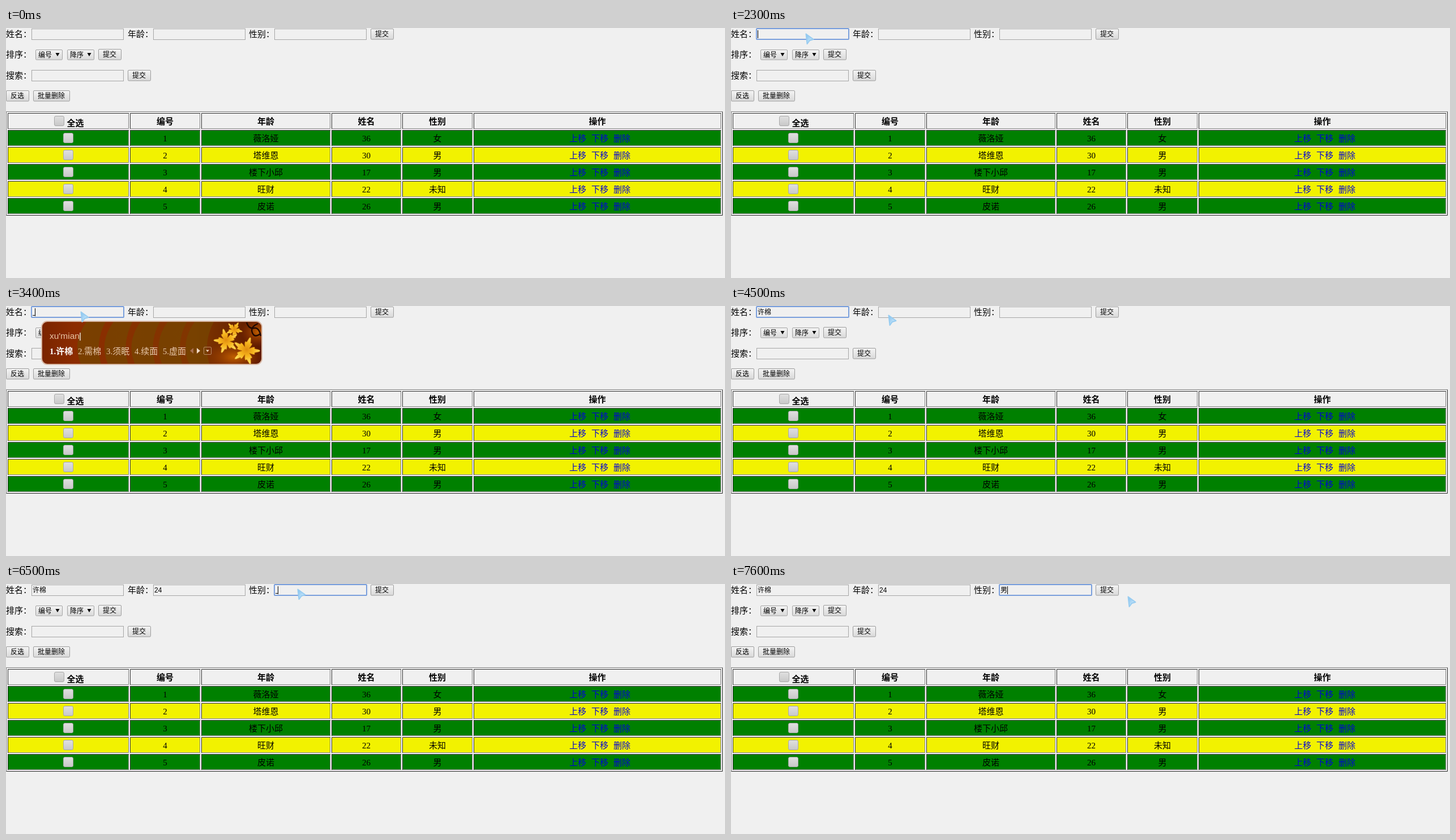
An HTML page that plays this animation: 1270x441 px, repeating every 8 s.

```html
<!DOCTYPE html>
<html lang="zh-CN">
<head>
<meta charset="utf-8">
<title>表格</title>
<style>
html, body { margin: 0; width: 100%; height: 100%; overflow: hidden; background: #f0f0f0; }
svg { display: block; }
text { font-family: "Liberation Serif", "Noto Sans CJK SC", serif; white-space: pre; }
.ui { font-family: "Liberation Sans", "Noto Sans CJK SC", sans-serif; }
</style>
</head>
<body>
<svg width="1270" height="441" viewBox="0 0 1270 441">
  <defs>
    <linearGradient id="btn" x2="0" y2="1"><stop stop-color="#f4f4f4"/><stop offset="1" stop-color="#d9d9d9"/></linearGradient>
    <linearGradient id="box" x2="0" y2="1"><stop stop-color="#e0e0e0"/><stop offset="1" stop-color="#c8c8c8"/></linearGradient>
    <linearGradient id="skin"><stop stop-color="#7a2400"/><stop offset=".15" stop-color="#8c2c00"/><stop offset=".7" stop-color="#803600"/><stop offset="1" stop-color="#5c1800"/></linearGradient>
    <radialGradient id="glow"><stop stop-color="#d06a00" stop-opacity=".85"/><stop offset="1" stop-color="#a03c00" stop-opacity="0"/></radialGradient>
    <radialGradient id="leafFill"><stop stop-color="#e08c10"/><stop offset=".5" stop-color="#f6b41c"/><stop offset="1" stop-color="#ffdc58"/></radialGradient>
    <linearGradient id="arrow" x2="1" y2="1"><stop stop-color="#7fc0ee"/><stop offset="1" stop-color="#e2f3ff"/></linearGradient>
    <path id="leaf" fill="url(#leafFill)" stroke="#c07008" stroke-width=".7"/>
  </defs>
  <g id="page"></g>
  <g id="live"></g>
  <g id="popup"></g>
  <path id="cursor" d="M1.5 1.5 L14.5 11 L8 13 L3.5 19Z" fill="url(#arrow)" stroke="#98ccf0" stroke-width="2" stroke-linejoin="round"/>
</svg>
<script>
const $ = id => document.getElementById(id);
const LOOP = 8000, STEP = 100;

const rect = (x, y, w, h, fill, more = '') =>
  `<rect x="${x}" y="${y}" width="${w}" height="${h}" fill="${fill}" ${more}/>`;
const text = (s, x, cy, size = 15, more = '') =>
  `<text x="${x}" y="${cy + size * .37}" font-size="${size}" ${more}>${s}</text>`;
const small = (s, x, cy) => text(s, x, cy, 12, 'class="ui"');
const centred = (s, x, cy, more = '') => text(s, x, cy, 15, `text-anchor="middle" ${more}`);

const field = (x, y) => rect(x + .5, y + .5, 162, 19, '#f0f0f0', 'stroke="#a6a6a6"');
const button = (s, x, y) =>
  rect(x + .5, y + .5, s.length * 12 + 16, 18.5, 'url(#btn)', 'rx="1.5" stroke="#9c9c9c"') + small(s, x + 8, y + 10);
const select = (s, x, y) =>
  rect(x + .5, y + .5, 47, 17.5, 'url(#btn)', 'rx="1.5" stroke="#a4a4a4"') + small(s, x + 5, y + 9.5) +
  `<path d="M${x + 35.5} ${y + 6}h7l-3.5 6z"/>`;
const checkbox = (x, y) => rect(x + .5, y + .5, 17, 17, 'url(#box)', 'rx="2.5" stroke="#a9a9a9"');

// A one pixel bevel: first colour on the top and left, second on the bottom and right.
const bevel = (x, y, w, h, fill, light, dark) =>
  rect(x, y, w, h, fill) +
  `<path d="M${x} ${y + h - .5}h${w - .5}v${.5 - h}" fill="none" stroke="${dark}"/>` +
  `<path d="M${x + .5} ${y + h}v${.5 - h}h${w - .5}" fill="none" stroke="${light}"/>`;

const cols = [3, 219, 345, 575, 700, 826, 1265];
const rows = [
  ['', '编号', '年龄', '姓名', '性别', '操作'],
  ['', 1, '薇洛娅', 36, '女', ''],
  ['', 2, '塔维恩', 30, '男', ''],
  ['', 3, '楼下小邱', 17, '男', ''],
  ['', 4, '旺财', 22, '未知', ''],
  ['', 5, '皮诺', 26, '男', '']
];

function tableRow(words, r) {
  const y = 150 + 30 * r, cy = y + 14.5;
  const fill = r ? ['#f2f200', '#008000'][r % 2] : '#f0f0f0';
  const weight = r ? '' : 'font-weight="700"';
  const cells = words.map((s, c) => {
    const x = cols[c], w = cols[c + 1] - 2 - x;
    return bevel(x, y, w, 28, fill, '#333', '#858585') + centred(s, x + w / 2, cy, weight);
  }).join('');
  if (!r) return cells + checkbox(85, y + 5) + text('全选', 107.5, cy + 3, 15, weight);
  const links = ['上移', '下移', '删除'].map((s, i) => text(s, 995 + 39 * i, cy, 15, 'fill="#0000d8"'));
  return cells + checkbox(101, y + 5) + links.join('');
}

const inputs = [45, 260, 474];
$('page').innerHTML =
  ['姓名：', '年龄：', '性别：'].map((s, i) => text(s, inputs[i] - 45, 10) + field(inputs[i], 1)).join('') +
  button('提交', 644, 1) +
  text('排序：', 0, 46.5) + select('编号', 52, 38) + select('降序', 108, 38) + button('提交', 163, 37) +
  text('搜索：', 0, 83.5) + field(45, 74) + button('提交', 215, 74) +
  button('反选', 0, 110) + button('批量删除', 48, 110) +
  bevel(0, 147, 1266, 184, '#f0f0f0', '#808080', '#2c2c2c') + rows.map(tableRow).join('');

// Five serrated lobes in polar form.
$('leaf').setAttribute('d', 'M' + Array.from({ length: 90 }, (_, i) => {
  const a = i * Math.PI / 45, r = 16 + 6 * Math.cos(5 * a) + 3 * Math.cos(15 * a);
  return (r * Math.sin(a)).toFixed(1) + ' ' + (-r * Math.cos(a)).toFixed(1);
}).join('L') + 'Z');

// Pointer moves: start, end, x, y
const moves = [
  [0, 0, 95, 182], [100, 900, 239, 13], [900, 1000, 304, 60], [1000, 1300, 140, 8], [1300, 1600, 131, 9],
  [3800, 3900, 193, 7], [4200, 4500, 277, 15], [5500, 5600, 295, 18], [5700, 5900, 450, 20],
  [6000, 6300, 514, 8], [7500, 7600, 700, 21]
];

// Input events: time, field, value, letters being composed, candidates
const events = [
  [1300, 0, ''],
  [2700, 0, '', 'x', '想 小 下 向 新'],
  [2800, 0, '', 'xu', '徐 许 需 虚 续'],
  [3000, 0, '', "xu'mi", '须弥 徐 许 需 虚'],
  [3200, 0, '', "xu'mia", '许棉 需棉 须眠 徐 许'],
  [3400, 0, '', "xu'mian", '许棉 需棉 须眠 续面 虚面'],
  [3600, 0, '许棉'],
  [4600, 1, ''],
  [5300, 1, '2'],
  [5500, 1, '24'],
  [6200, 2, ''],
  [6500, 2, '', 'n'],
  [7000, 2, '', 'na', '纳 那 拿 (=@__@=)哪里? 哪'],
  [7100, 2, '', 'nan', '男 南 难 楠 喃'],
  [7200, 2, '男']
];

const pen = document.createElement('canvas').getContext('2d');
function measure(s, size, font) {
  pen.font = `${size}px "${font}", "Noto Sans CJK SC", sans-serif`;
  return pen.measureText(s).width;
}

function pointer(t) {
  let [, , x, y] = moves[0];
  for (const [start, end, tx, ty] of moves.slice(1)) {
    if (t < start) break;
    const p = Math.min(1, (t - start) / (end - start)) ** 1.6;
    x += (tx - x) * p;
    y += (ty - y) * p;
  }
  return t < STEP ? [-50, -50] : [x, y];
}

function drawInputs(t, event) {
  if (!event) return '';
  const [time, focus, , typed] = event, values = ['', '', ''];
  for (const [start, i, value] of events) if (start <= t) values[i] = value;
  const x = inputs[focus];
  let out = rect(x, 1, 163, 19, '#f0f0f0', 'rx="1.5" stroke="#7a9fdc" stroke-width="2"');
  inputs.forEach((left, i) => out += small(values[i], left + 2, 10.5));
  const caret = Math.round(x + 2 + measure(values[focus], 12, 'Liberation Sans')) + (typed ? 4 : 0);
  if ((t - time) % 1000 < 500) out += rect(caret, 4, 1, 14, '#000');
  if (typed) out += rect(x + 2, 16, 4, 1, '#000');
  return out;
}

function drawPopup(event) {
  const [, focus, , typed, words] = event || [];
  if (!words) return '';
  const list = words.split(' ').map((s, i) => `${i + 1}.${s}`);
  const space = 8.7, size = 15;
  const w = Math.round(150 + measure(list.join(''), size, 'Liberation Serif') + space * 4);

  let sweeps = '';
  const gap = (w - 152) / 5;
  for (let i = 0; i < 5; i++) {
    const a = 66 + gap * i;
    sweeps += `<path d="M${a + 14} 2Q${a - 12} 38 ${a + 4} 76h${gap * .75}Q${a + gap * .6} 38 ${a + gap} 2Z" fill="#764400" opacity=".8"/>`;
  }
  const leaf = (x, y, scale, turn) =>
    `<use href="#leaf" transform="translate(${w + x} ${y}) rotate(${turn}) scale(${scale})"/>`;
  const spans = list.map((s, i) => i
    ? `<tspan dx="${space}">${s}</tspan>`
    : `<tspan fill="#fff" font-weight="700">${s}</tspan>`).join('');

  return `<g transform="translate(${inputs[focus] + 17} 26)">` +
    '<clipPath id="clip">' + rect(2, 2, w - 4, 74, '#000', 'rx="9"') + '</clipPath>' +
    rect(1, 1, w - 2, 76, 'url(#skin)', 'rx="10"') +
    `<g clip-path="url(#clip)">${sweeps}` +
    `<ellipse cx="${w - 50}" cy="64" rx="52" ry="28" fill="url(#glow)"/>` +
    `<ellipse cx="${w - 8}" cy="20" rx="30" ry="26" fill="url(#glow)"/>` +
    `<path d="M${w - 28} 3q4 12 13 10t12 14M${w - 8} 5q-14 6 -10 16t14 2" fill="none" stroke="#200800" stroke-width="2.4"/>` +
    leaf(-50, 16, .6, 30) + leaf(-64, 36, .9, -14) + leaf(-29, 53, 1, 18) + '</g>' +
    rect(1, 1, w - 2, 76, 'none', 'rx="10" stroke="#d8b8a6" stroke-width="2"') +
    `<text class="ui" x="15" y="32" font-size="15.5" fill="#e8c4a4">${typed}<tspan fill="#fff" dx="-1">|</tspan></text>` +
    text(spans, 15, 53, size, 'fill="#e8c8ac"') +
    `<path d="M${w - 122} 48v10l-6 -5z" fill="#a87050"/><path d="M${w - 116} 48v10l6 -5z" fill="#f0d8c4"/>` +
    rect(w - 103.5, 46.5, 13, 13, 'none', 'rx="1.5" stroke="#b98a68"') +
    `<path d="M${w - 100} 51.5h6l-3 3.5z" fill="#f0d8c4"/></g>`;
}

const shown = {};
function put(id, html) {
  if (shown[id] !== html) $(id).innerHTML = shown[id] = html;
}

function frame() {
  const t = Math.floor(performance.now() % LOOP / STEP) * STEP;
  const event = events.findLast(e => e[0] <= t);
  put('live', drawInputs(t, event));
  put('popup', drawPopup(event));
  $('cursor').setAttribute('transform', `translate(${pointer(t).map(Math.round)})`);
  requestAnimationFrame(frame);
}
frame();
</script>
</body>
</html>
```
